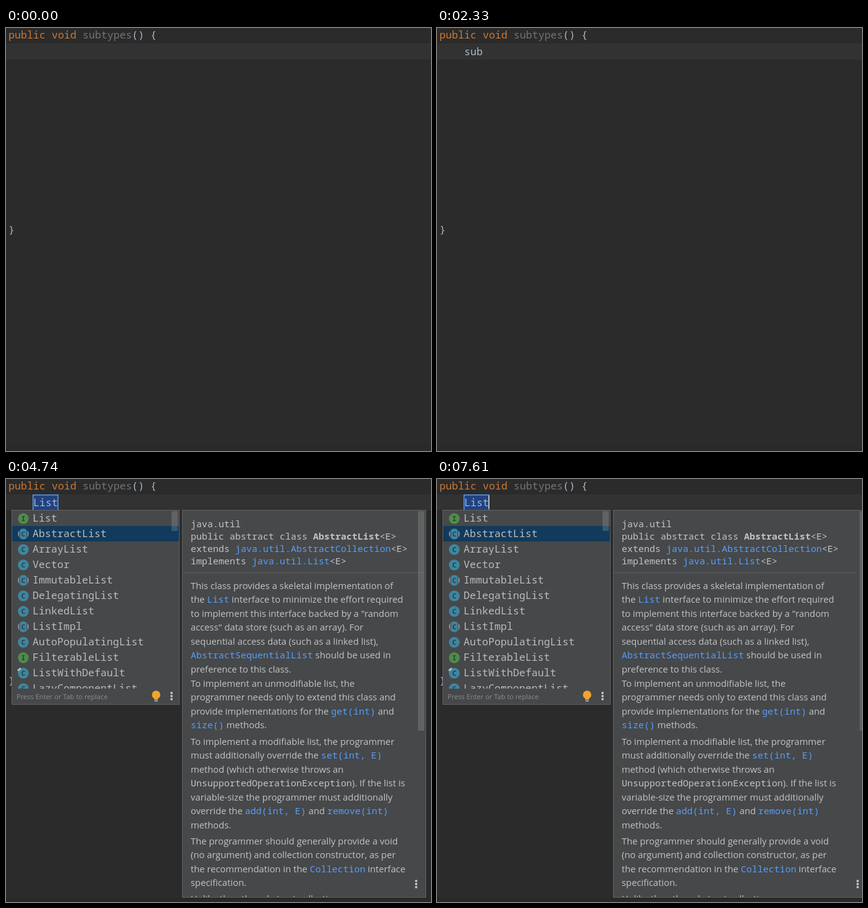
Write an HTML page with a canvas that moves like this. It is 688 px wide and 684 px high and loops after 8.03 s.

```html
<!DOCTYPE html>
<html lang="en">
<head>
<meta charset="utf-8">
<title>Subtype completion</title>
<style>
html, body { margin: 0; width: 100%; height: 100%; overflow: hidden; background: #2b2b2b; }
canvas { display: block; }
</style>
</head>
<body>
<canvas id="stage" width="688" height="684"></canvas>
<script>
const ctx = document.getElementById('stage').getContext('2d');
const LOOP = 8030;
const MONO = '"Noto Sans Mono", monospace';
const SANS = '"Open Sans", "Noto Sans", sans-serif';
const CODE = `16.667px ${MONO}`;
const DOC_CODE = `15px ${MONO}`;
const DOC_TEXT = `14.8px ${SANS}`;
const DOC_BOLD = `bold 15.2px ${SANS}`;
const HINT = `11.1px ${SANS}`;
const C = {
  bg: '#2b2b2b', row: '#323232', text: '#a9b7c6', keyword: '#cc7832', unused: '#72737a',
  panel: '#46484a', edge: '#606264', label: '#bbbbbb', prose: '#c3c3c3', dim: '#8a8c8e',
  link: '#589df6', active: '#113a5c', idle: '#505457', thumb: 'rgba(166,166,166,0.28)',
  blue: '#3e86a0', green: '#4f8c48', pink: '#b3657b', letter: '#2b3a40'
};

// Times at which the caret flips, starting from hidden.
const BLINKS = [70, 530, 700, 1940, 2480, 3030, 3120, 3590, 4060, 4590,
  5060, 5550, 5870, 6550, 6630, 7120, 7610];

const TIP = 'Press Ctrl+. to choose the selected (or first) suggestion and insert a dot afterwards';

// icon, name, tail, type, bold
const SUB = ['', 'sub', '', 'Subtypes', false];
const SUPER = ['', 'super', '', '', true];
const METHOD = ['m', 'subtypes', '()', 'void', true];
const WORDS = ['short', 'switch', 'synchronized'].map(w => ['', w, '', '', true]);
const CLASSES = ['String', 'Short', 'System', 'StringBuilder', 'StringBuffer', 'Step']
  .map(w => ['C', w, '', '', false]);
const MATCHES = [
  [],
  [SUB, SUPER, METHOD, ...WORDS, ...CLASSES],
  [SUB, SUPER, METHOD],
  [SUB, METHOD]
];

const TYPES = ['I List', 'A AbstractList', 'C ArrayList', 'C Vector', 'A ImmutableList',
  'C DelegatingList', 'C LinkedList', 'A ListImpl', 'C AutoPopulatingList',
  'I FilterableList', 'F ListWithDefault', 'C LazyComponentList'].map(s => s.split(' '));

// Markup: `code`, [linked code], _italic_, *bold*
const ABSTRACT_LIST = {
  head: ['java.util', 'public abstract class *AbstractList*<E>',
    'extends [java.util.AbstractCollection]<E>', 'implements [java.util.List]<E>'],
  body: [
    [178, 'This class provides a skeletal implementation of',
      'the [List] interface to minimize the effort required',
      'to implement this interface backed by a "random',
      'access" data store (such as an array). For',
      'sequential access data (such as a linked list),',
      '[AbstractSequentialList] should be used in',
      'preference to this class.'],
    [336, 'To implement an unmodifiable list, the',
      'programmer needs only to extend this class and',
      'provide implementations for the [get(int)] and',
      '[size()] methods.'],
    [430, 'To implement a modifiable list, the programmer',
      'must additionally override the [set(int, E)]',
      'method (which otherwise throws an',
      '`UnsupportedOperationException`). If the list is',
      'variable-size the programmer must additionally',
      'override the [add(int, E)] and [remove(int)]',
      'methods.'],
    [591, 'The programmer should generally provide a void',
      '(no argument) and collection constructor, as per',
      'the recommendation in the [Collection] interface',
      'specification.'],
    [684, 'Unlike the other abstract collection']
  ]
};

const ARRAY_LIST = {
  head: ['java.util', 'public class *ArrayList*<E>', 'extends [java.util.AbstractList]<E>',
    'implements [java.util.List]<E>, [java.util.RandomAccess]'],
  body: [
    [178, 'Resizable-array implementation of the `List` interface. Implements all',
      'operations, and permits all elements, including `null`. In addition to',
      '`List` interface, this class provides methods to manipulate the size',
      'used internally to store the list. (This class is roughly equivalent to',
      'that it is unsynchronized.)'],
    [291, 'The `size`, `isEmpty`, `get`, `set`, `iterator`, and `listIterator`',
      'constant time. The `add` operation runs in _amortized constant time_',
      'elements requires O(n) time. All of the other operations run in linear',
      'speaking). The constant factor is low compared to that for the',
      'implementation.'],
    [408, 'Each `ArrayList` instance has a _capacity_. The capacity is the size',
      'store the elements in the list. It is always at least as large as the',
      'are added to an ArrayList, its capacity grows automatically. The',
      'policy are not specified beyond the fact that adding an element has',
      'amortized time cost.'],
    [524, 'An application can increase the capacity of an `ArrayList` instance',
      'large number of elements using the `ensureCapacity` operation.',
      'the amount of incremental reallocation.'],
    [595, '*Note that this implementation is not synchronized.* If multiple',
      '`ArrayList` instance concurrently, and at least one of the threads',
      'structurally, it _must_ be synchronized externally. (A structural',
      'operation that adds or deletes one or more elements, or explicitly',
      'array; merely setting the value of an element is not a structural']
  ]
};

function rect(x, y, w, h, color) {
  ctx.fillStyle = color;
  ctx.fillRect(x, y, w, h);
}

function disc(x, y, r, color) {
  ctx.fillStyle = color;
  ctx.beginPath();
  ctx.arc(x, y, r, 0, Math.PI * 2);
  ctx.fill();
}

// Draws text and returns where it ends.
function put(str, x, y, font, color, align = 'left') {
  ctx.font = font;
  ctx.fillStyle = color;
  ctx.textAlign = align;
  ctx.fillText(str, x, y);
  return x + ctx.measureText(str).width;
}

function clipped(x, y, w, h, draw) {
  ctx.save();
  ctx.beginPath();
  ctx.rect(x, y, w, h);
  ctx.clip();
  draw();
  ctx.restore();
}

function panel(x, y, w, h) {
  rect(x, y, w, h, C.edge);
  rect(x + 1, y + 1, w - 2, h - 2, C.panel);
}

function dots(x, y) {
  for (const d of [-5, 0, 5]) disc(x, y + d, 2, '#bfc1c3');
}

function icon(kind, y) {
  const x = 28;
  const slice = (left, w, color) =>
    clipped(x + left, y - 9, w, 18, () => disc(x, y, 8.7, color));
  if (kind === 'A') {
    slice(-9, 2.5, '#8d979d');
    slice(-5.3, 10.6, C.blue);
    slice(6.5, 2.5, '#8d979d');
  } else {
    disc(x, y, 8.7, kind === 'I' ? C.green : kind === 'm' ? C.pink : C.blue);
  }
  const letter = kind === 'A' || kind === 'F' ? 'C' : kind;
  const small = letter === 'm';
  put(letter, x, y + (small ? 3.5 : 4), `bold ${small ? 13 : 11}px ${MONO}`, C.letter, 'center');
  if (kind === 'F') {
    ctx.strokeStyle = '#b4bbc0';
    ctx.lineWidth = 3;
    ctx.beginPath();
    ctx.moveTo(x - 9, y - 4);
    ctx.lineTo(x - 4, y - 8);
    ctx.stroke();
  }
}

function bulb() {
  disc(243, 349, 6.8, '#f2a52c');
  rect(240, 353, 6, 3, '#f2a52c');
  rect(240, 356.5, 6, 1.3, '#b4b6b8');
  rect(240.5, 358.7, 5, 1.3, '#b4b6b8');
}

function editor(typed, boxed) {
  rect(0, 0, 688, 684, C.bg);
  rect(0, 677, 688, 7, '#292929');
  rect(0, 25, 688, 26, C.row);
  let x = put('public void ', 4, 17, CODE, C.keyword);
  x = put('subtypes', x, 17, CODE, C.unused);
  put('() {', x, 17, CODE, C.text);
  put('}', 4, 332, CODE, C.text);
  if (boxed) {
    rect(43, 25, 42, 26, '#5e9ae2');
    rect(44.5, 26.5, 39, 23.5, '#214283');
  }
  put(typed, 44, 44, CODE, C.text);
}

function suggestions(count) {
  const rows = MATCHES[count];
  const listH = Math.min(rows.length * 25, 288);
  const h = listH + 27;
  panel(9, 50, 545, h);
  rect(10, 51, 543, 25, C.idle);
  clipped(10, 51, 543, listH, () => rows.forEach(([kind, name, tail, type, bold], i) => {
    const y = 69 + i * 25;
    const font = (bold ? 'bold ' : '') + CODE;
    if (kind) icon(kind, y - 5);
    let x = put(name.slice(0, count), 43, y, font, C.link);
    x = put(name.slice(count), x, y, font, C.label);
    put(tail, x, y, CODE, C.dim);
    put(type, 539, y, CODE, C.dim, 'right');
  }));
  const base = 50 + h;
  put(TIP, 17, base - 8, HINT, C.dim);
  put('Next Tip', 453, base - 8, HINT, C.link);
  dots(540, base - 13);
}

function typeList(selected, lit) {
  panel(9, 50, 272, 315);
  rect(10, 51 + selected * 25, 270, 25, C.active);
  clipped(10, 51, 270, 288, () => TYPES.forEach(([kind, name], i) => {
    icon(kind, 64 + i * 25);
    put(name, 43, 69 + i * 25, CODE, C.label);
  }));
  rect(268, 52, 10, 32, C.thumb);
  put('Press Enter or Tab to replace', 17, 356, HINT, C.dim);
  if (lit) bulb();
  dots(268, 351);
}

function richLine(line, y, plain, bold) {
  const fonts = { '`': DOC_CODE, '[': DOC_CODE, '*': bold, '_': 'italic ' + plain };
  let x = 299;
  for (const part of line.match(/`[^`]*`|\[[^\]]*\]|_[^_]*_|\*[^*]*\*|[^`\[_*]+/g)) {
    const font = fonts[part[0]];
    const str = font ? part.slice(1, -1) : part;
    x = put(str, x, y, font || plain, part[0] === '[' ? C.link : C.prose);
  }
}

function docs(doc, right, ruleEnd) {
  panel(285, 50, right - 285, 627);
  rect(286, 151, ruleEnd - 286, 1, '#5a5c5e');
  clipped(286, 51, right - 287, 625, () => {
    doc.head.forEach((line, i) => richLine(line, 78 + i * 20, DOC_CODE, 'bold ' + DOC_CODE));
    for (const [top, ...lines] of doc.body)
      lines.forEach((line, i) =>
        richLine(line, Math.round(top + i * 22.45), DOC_TEXT, DOC_BOLD));
  });
}

function abstractDocs(shift) {
  docs(ABSTRACT_LIST, 680 + shift, 679);
  rect(667 + shift, 52, 10, 355, C.thumb);
  dots(664 + shift, 655);
}

function arrayDocs() {
  docs(ARRAY_LIST, 900, 899);
  rect(287, 664, 339, 10, C.thumb);
}

const within = (t, a, b) => t >= a && t < b;

function draw(t) {
  const boxed = t >= 2480;
  const count = t < 700 ? 0 : t < 1010 ? 1 : t < 1390 ? 2 : 3;
  const typed = boxed ? 'List' : 'sub'.slice(0, count);
  editor(typed, boxed);

  if (BLINKS.filter(b => b <= t).length % 2)
    rect(43 + typed.length * 10, 27, 2, 21, '#bbbbbb');

  if (within(t, 760, 2330)) suggestions(count);
  if (t >= 2560) {
    const selected = t < 3120 ? 0 : within(t, 5870, 6630) ? 2 : 1;
    const lit = within(t, 3030, 3120) || within(t, 3590, 5870) ||
      within(t, 6370, 6630) || t >= 7120;
    typeList(selected, lit);
  }
  if (within(t, 4740, 5950)) abstractDocs(0);
  else if (within(t, 5950, 6700)) arrayDocs();
  else if (t >= 6700) abstractDocs(17);
}

const start = performance.now();
function tick() {
  draw((performance.now() - start) % LOOP);
  requestAnimationFrame(tick);
}
tick();
</script>
</body>
</html>
```
